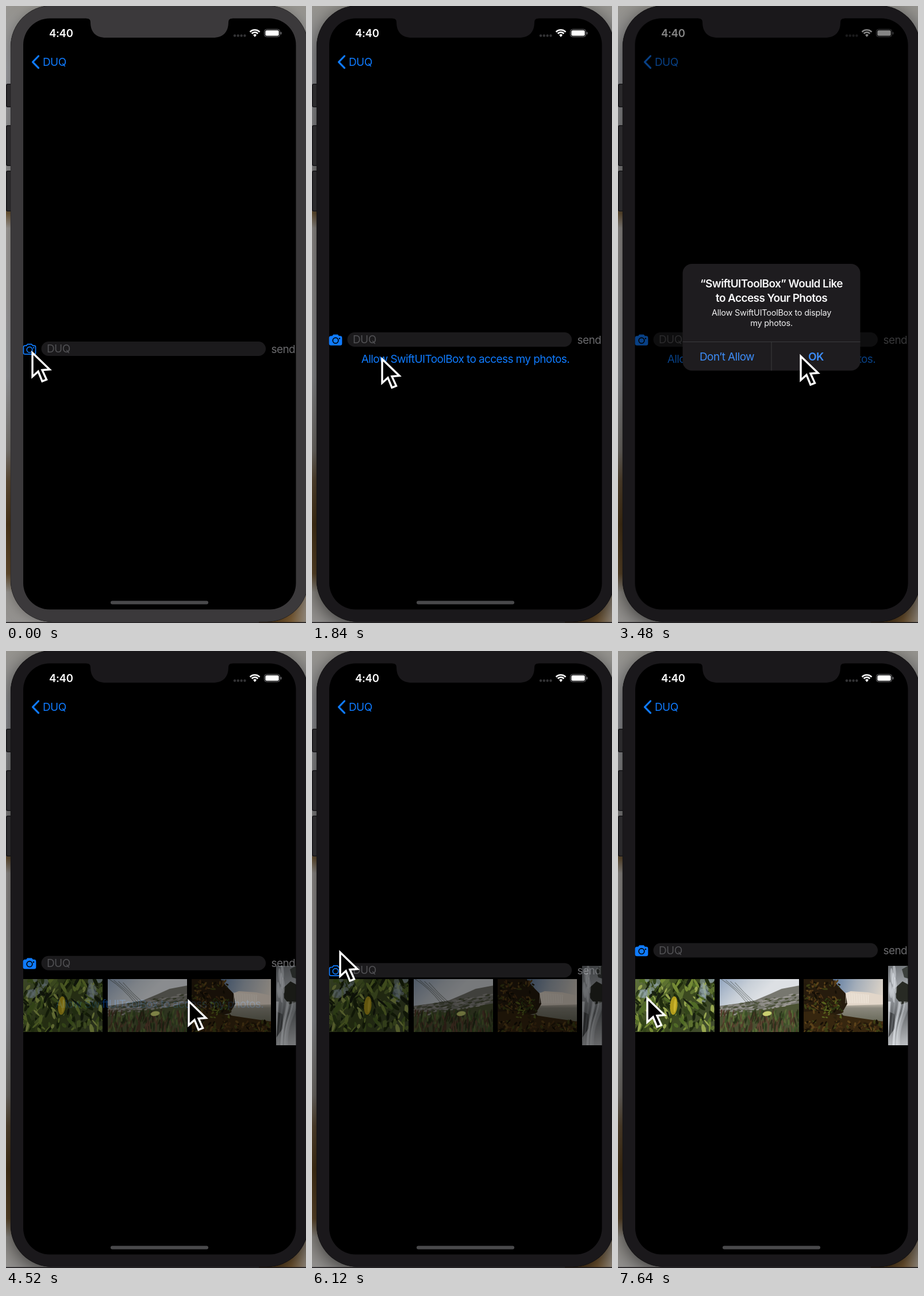
Animation of 522 by 1072 pixels, one loop 7680 ms. Source, as an HTML page with a canvas:

```html
<!DOCTYPE html>
<html lang="en">
<head>
<meta charset="utf-8">
<title>Photo permission demo</title>
<style>
html, body { margin: 0; width: 100%; height: 100%; overflow: hidden; background: #000; }
canvas { display: block; width: 522px; height: 1072px; }
</style>
</head>
<body>
<canvas id="stage" width="522" height="1072"></canvas>
<script>
const LOOP = 7680;
const BLUE = '#0f7bff';
const NAME = 'DUQ';
const ctx = document.getElementById('stage').getContext('2d');

const clamp = v => Math.max(0, Math.min(1, v));
const mix = (a, b, p) => a + (b - a) * p;
const span = (t, from, to) => clamp((t - from) / (to - from));
const easeOut = p => 1 - (1 - p) ** 3;
const smooth = p => p * p * (3 - 2 * p);

// cubic-bezier(.42, 0, .58, 1)
function easeInOut(x) {
  let lo = 0, hi = 1, u = x;
  for (let i = 0; i < 18; i++) {
    u = (lo + hi) / 2;
    const bx = 1.26 * u * (1 - u) ** 2 + 1.74 * u * u * (1 - u) + u ** 3;
    if (bx < x) lo = u; else hi = u;
  }
  return smooth(u);
}
const slide = (t, start) => easeInOut(span(t, start, start + 350));

function seeded(seed) {
  return () => (seed = (seed * 16807) % 2147483647) / 2147483647;
}

function gradient(c, x0, y0, x1, y1, colors) {
  const g = c.createLinearGradient(x0, y0, x1, y1);
  colors.forEach(([at, color]) => g.addColorStop(at, color));
  return g;
}

function box(x, y, w, h, r, color, c = ctx) {
  c.fillStyle = color;
  c.beginPath();
  c.roundRect(x, y, w, h, r);
  c.fill();
}

function leaf(c, x, y, len, width, angle, color) {
  c.fillStyle = color;
  c.beginPath();
  c.ellipse(x, y, len, width, angle, 0, 7);
  c.fill();
}
const disc = (x, y, r, color, c = ctx) => leaf(c, x, y, r, r, 0, color);

function poly(c, points, color) {
  c.fillStyle = color;
  c.beginPath();
  points.forEach(([x, y]) => c.lineTo(x, y));
  c.closePath();
  c.fill();
}

// y is the middle of the capital letters
function text(s, x, y, color, { size = 19, weight = 400, align = 'left', track = -0.6 } = {}) {
  ctx.font = `${weight} ${size}px Inter, sans-serif`;
  ctx.letterSpacing = track + 'px';
  ctx.textAlign = align;
  ctx.fillStyle = color;
  ctx.fillText(s, x, y + size * 0.364);
}

function makePhoto(w, h, paint) {
  const canvas = document.createElement('canvas');
  canvas.width = w;
  canvas.height = h;
  const c = canvas.getContext('2d');
  c.filter = 'blur(0.7px)';
  paint(c, seeded(w * 31 + h));
  return canvas;
}

function foliage(c, rnd) {
  c.fillStyle = gradient(c, 0, 0, 138, 92, [[0, '#5f7040'], [.45, '#3a481c'], [1, '#424d30']]);
  c.fillRect(-2, -2, 142, 96);
  const greens = ['#1e2a0d', '#33451a', '#506a26', '#748a35', '#98a750', '#182010', '#5d7130'];
  for (let i = 0; i < 200; i++) {
    if (i % 11 === 0) {
      const x = i % 2 ? rnd() * 40 : 115 + rnd() * 23;
      disc(x, rnd() * 42, 3 + rnd() * 5, 'rgba(150,168,178,.55)', c);
    }
    leaf(c, rnd() * 138, rnd() * 92, 4 + rnd() * 8, 1.3 + rnd() * 2.4, .6 + rnd() * 1.9, greens[i % greens.length]);
  }
  leaf(c, 67, 46, 16, 6.5, 1.65, '#b39d1c');
  leaf(c, 69, 46, 12, 2, 1.65, '#cdb62f');
}

function meadow(c, rnd) {
  c.fillStyle = gradient(c, 0, 0, 50, 50, [[0, '#93a6c0'], [.6, '#c9d0d8'], [1, '#dde0e4']]);
  c.fillRect(-2, -2, 142, 96);
  poly(c, [[-2, 47], [35, 42], [62, 37], [88, 26], [108, 17], [140, 11], [140, 94], [-2, 94]], '#77776f');
  poly(c, [[-2, 59], [40, 54], [85, 51], [140, 42], [140, 94], [-2, 94]], '#4a5232');
  for (let i = 0; i < 170; i++) {
    const x = rnd() * 138;
    leaf(c, x, 49 - x * .18 + rnd() * 18, 2 + rnd() * 3, 1.3, -.2,
      ['#8d8b86', '#5b5f4c', '#9c9994', '#4a5038'][i % 4]);
  }
  for (let i = 0; i < 240; i++) {
    leaf(c, rnd() * 138, 58 + rnd() * 36, 4 + rnd() * 6, 1.2, 1.3 + rnd() * .7,
      ['#394f25', '#5b7038', '#4b3626', '#272f18', '#624534'][i % 5]);
  }
  c.strokeStyle = 'rgba(60,66,58,.75)';
  c.lineWidth = 1;
  for (let i = 0; i < 4; i++) {
    c.beginPath();
    c.moveTo(3 + i * 8, i * 2);
    c.quadraticCurveTo(28 + i * 5, 16 + i * 3, 48 + i * 5, 42);
    c.stroke();
  }
  leaf(c, 83, 60, 8, 4, -.15, '#c8cf70');
}

function waterfall(c, rnd) {
  c.fillStyle = gradient(c, 40, 0, 138, 30, [[0, '#4d6f9b'], [.5, '#a3adb9'], [1, '#dfd5c8']]);
  c.fillRect(-2, -2, 142, 96);
  c.fillStyle = gradient(c, 0, 42, 0, 76, [[0, '#cbc1b3'], [.25, '#8a877c'], [1, '#676858']]);
  c.fillRect(-2, 42, 142, 52);
  poly(c, [[66, 27], [82, 21], [112, 23], [140, 29], [140, 44], [74, 46]], '#e2d6c9');
  poly(c, [[-2, -2], [49, -2], [61, 13], [73, 25], [76, 43], [66, 60], [-2, 70]], '#261b0d');
  poly(c, [[-2, 57], [30, 55], [60, 62], [92, 67], [140, 74], [140, 94], [-2, 94]], '#36260f');
  for (let i = 0; i < 240; i++) {
    const x = rnd() * 138;
    const cliff = i % 2;
    leaf(c, cliff ? x * .45 : x, cliff ? 4 + rnd() * 54 : 74 + rnd() * 20, 2 + rnd() * 3, 1 + rnd(), rnd() * 3,
      ['#150f06', '#4a3114', '#5c431a', '#241a0b', '#3d4015'][i % 5]);
  }
  for (let i = 0; i < 60; i++) {
    leaf(c, 34 + rnd() * 34, 34 + rnd() * 34, 2 + rnd() * 2, 1.2, rnd() * 3, ['#59651f', '#303d14', '#2b210d'][i % 3]);
  }
  c.strokeStyle = 'rgba(255,250,240,.6)';
  for (let i = 0; i < 14; i++) {
    c.beginPath();
    c.moveTo(74 + i * 3, 23 + i * .3);
    c.lineTo(73 + i * 3, 42);
    c.stroke();
  }
}

function stream(c, rnd) {
  c.fillStyle = gradient(c, 0, 0, 36, 138, [[0, '#6d7175'], [.3, '#a5a9ae'], [.6, '#66696c'], [1, '#bfc1c4']]);
  c.fillRect(-2, -2, 40, 142);
  poly(c, [[13, 38], [25, 27], [38, 34], [38, 62], [23, 67], [14, 56]], '#282a24');
  poly(c, [[-2, 78], [11, 84], [12, 108], [-2, 128]], '#414345');
  poly(c, [[24, 6], [38, -2], [38, 23], [28, 20]], '#3c403d');
  c.lineWidth = 3;
  for (let i = 0; i < 14; i++) {
    const x = rnd() * 36;
    c.strokeStyle = `rgba(232,236,241,${.15 + rnd() * .35})`;
    c.beginPath();
    c.moveTo(x, 62);
    c.bezierCurveTo(x - 2, 85, x * .5, 98, x * .65 - 4, 138);
    c.stroke();
  }
  for (let i = 0; i < 6; i++) leaf(c, 3 + rnd() * 12, 10 + i * 8, 14, 2.5, 1.5, 'rgba(228,232,237,.5)');
}

const photos = [
  [30, 570, makePhoto(138, 92, foliage)],
  [176.5, 570, makePhoto(138, 92, meadow)],
  [323, 570, makePhoto(138, 92, waterfall)],
  [470, 547, makePhoto(36, 138, stream)]
];

function drawDesktop(focused) {
  ctx.fillStyle = gradient(ctx, 0, 0, 0, 1072, [
    [0, '#96948f'], [.1, '#95969a'], [.31, '#858483'], [.335, '#695334'], [.36, '#9a9693'],
    [.6, '#929396'], [.72, '#77736e'], [.77, '#5c4a33'], [.84, '#493417'], [.92, '#60492b'], [.95, '#918e89'], [1, '#949290']
  ]);
  ctx.fillRect(0, 0, 522, 1072);
  ctx.fillStyle = gradient(ctx, 470, 0, 522, 0, [[0, '#5d421f'], [.5, '#785a33'], [1, '#8d8478']]);
  ctx.fillRect(440, 1000, 82, 72);
  // window shadow, deepest beside the body
  ctx.save();
  ctx.shadowColor = `rgba(0,0,0,${focused ? .6 : .25})`;
  ctx.shadowBlur = focused ? 34 : 20;
  ctx.shadowOffsetY = focused ? 8 : 2;
  box(8, -1, 518, 1071, 72, '#000');
  ctx.restore();
  ctx.fillStyle = '#19171a';
  ctx.fillRect(0, 1070.5, 522, 2);
  [[135, 41], [207, 71], [286, 71]].forEach(([y, h]) => {
    box(0, y, 12, h, 3, '#171619');
    box(1.5, y + 1.5, 8, h - 3, 2, '#2b2a2c');
  });
}

function drawBody(color) {
  box(8, -1, 518, 1071, 72, color);
  ctx.strokeStyle = 'rgba(0,0,0,.25)';
  ctx.lineWidth = 1;
  ctx.stroke();
  box(30, 21.5, 474.5, 1027, 46, '#000');
}

function drawNotch(color) {
  ctx.fillStyle = color;
  ctx.beginPath();
  ctx.moveTo(140, 20);
  ctx.lineTo(140, 21.5);
  ctx.quadraticCurveTo(147, 21.5, 147, 28);
  ctx.bezierCurveTo(147, 45, 156, 55, 174, 55);
  ctx.lineTo(360, 55);
  ctx.bezierCurveTo(378, 55, 387, 45, 387, 28);
  ctx.quadraticCurveTo(387, 21.5, 394, 21.5);
  ctx.lineTo(394, 20);
  ctx.fill();
}

function drawStatus() {
  text('4:40', 75, 47.5, '#fff', { weight: 600, size: 18.5, track: -.3 });
  for (let i = 0; i < 4; i++) disc(398 + i * 5.8, 51.5, 2.2, '#343436');
  ctx.strokeStyle = '#fff';
  ctx.lineWidth = 2.7;
  [7.3, 11.5].forEach(r => {
    ctx.beginPath();
    ctx.arc(433, 53, r, -Math.PI * .76, -Math.PI * .24);
    ctx.stroke();
  });
  ctx.fillStyle = '#fff';
  ctx.beginPath();
  ctx.moveTo(433, 54);
  ctx.arc(433, 53, 4, -Math.PI * .76, -Math.PI * .24);
  ctx.fill();
  ctx.strokeStyle = '#77777a';
  ctx.lineWidth = 1;
  ctx.beginPath();
  ctx.roundRect(449.5, 40.5, 27, 13, 4);
  ctx.stroke();
  box(451.3, 42.2, 23.4, 9.6, 2.5, '#fff');
  box(477.8, 45, 1.6, 4.5, 1, '#77777a');
}

function drawBack() {
  ctx.strokeStyle = BLUE;
  ctx.lineWidth = 3.2;
  ctx.lineCap = 'round';
  ctx.lineJoin = 'round';
  ctx.beginPath();
  ctx.moveTo(56.5, 87);
  ctx.lineTo(46.5, 97.3);
  ctx.lineTo(56.5, 107.6);
  ctx.stroke();
  text(NAME, 64, 97.5, BLUE);
}

function drawCamera(y, filled) {
  ctx.save();
  ctx.translate(41, y);
  ctx.lineWidth = 1.7;
  ctx.lineJoin = 'round';
  ctx.strokeStyle = ctx.fillStyle = BLUE;
  ctx.beginPath();
  ctx.moveTo(-10.5, -3.5);
  ctx.quadraticCurveTo(-10.5, -6, -8, -6);
  ctx.lineTo(-5.5, -6);
  ctx.lineTo(-3.5, -8.6);
  ctx.lineTo(3.5, -8.6);
  ctx.lineTo(5.5, -6);
  ctx.lineTo(8, -6);
  ctx.quadraticCurveTo(10.5, -6, 10.5, -3.5);
  ctx.lineTo(10.5, 6);
  ctx.quadraticCurveTo(10.5, 8.7, 8, 8.7);
  ctx.lineTo(-8, 8.7);
  ctx.quadraticCurveTo(-10.5, 8.7, -10.5, 6);
  ctx.closePath();
  ctx.stroke();
  if (filled) ctx.fill();
  ctx.strokeStyle = filled ? '#000' : BLUE;
  ctx.beginPath();
  ctx.arc(0, 1, 4.8, 0, 7);
  ctx.stroke();
  disc(7, -2.5, 1.2, filled ? '#000' : BLUE);
  ctx.restore();
}

function drawRow(y, filled) {
  drawCamera(y + .7, filled);
  box(61.5, y - 12.5, 390.5, 25, 12.5, '#1b1a1c');
  text(NAME, 71, y - .3, '#505053');
  text('send', 461.5, y + .3, '#69696c');
}

function drawAlert(scale, alpha) {
  ctx.save();
  ctx.globalAlpha = alpha;
  ctx.translate(267, 540.7);
  ctx.scale(scale, scale);
  ctx.translate(-267, -540.7);
  box(112.5, 448, 309, 185.5, 16, '#1e1c1f');
  const title = { weight: 600, align: 'center' };
  const note = { size: 14.5, align: 'center', track: -.23 };
  text('“SwiftUIToolBox” Would Like', 267, 482, '#f7f7f8', title);
  text('to Access Your Photos', 267, 507.5, '#f7f7f8', title);
  text('Allow SwiftUIToolBox to display', 267, 532.5, '#f0f0f1', note);
  text('my photos.', 267, 550.5, '#f0f0f1', note);
  ctx.fillStyle = '#3b3a3d';
  ctx.fillRect(112.5, 583, 309, 1);
  ctx.fillRect(266.5, 583, 1, 50.5);
  text('Don’t Allow', 189.5, 609, '#3d8df8', { align: 'center' });
  text('OK', 344.5, 609, '#3d8df8', title);
  ctx.restore();
}

const arrow = [[2, 4.5], [2, 46], [12, 37], [19, 54], [26.5, 51], [19, 34.5], [32, 33.5]];
function drawCursor([x, y]) {
  ctx.save();
  ctx.translate(x, y);
  poly(ctx, arrow, '#000');
  ctx.strokeStyle = '#fff';
  ctx.lineWidth = 3.4;
  ctx.lineJoin = 'miter';
  ctx.stroke();
  ctx.restore();
}

const moves = [
  [1240, 2200, 155, 614],
  [3200, 3450, 316, 604],
  [4800, 5700, 47, 519],
  [6420, 6900, 49, 599]
];
function cursorAt(t) {
  return moves.reduce(([x, y], [from, to, nx, ny]) => {
    const p = smooth(span(t, from, to));
    return [mix(x, nx, p), mix(y, ny, p)];
  }, [44, 598]);
}

function draw(t) {
  const focused = t >= 400;
  const body = focused ? '#1a181b' : '#3b393b';
  const ask = slide(t, 800);
  const grant = slide(t, 4320);
  const close = slide(t, 5954);
  const reopen = slide(t, 7100);
  const shown = easeOut(span(t, 2590, 3030));
  const hidden = smooth(span(t, 3760, 4040));
  const modal = shown * (1 - hidden);

  let rowY = mix(595.5, 579.5, ask);
  rowY = mix(rowY, 520, grant);
  rowY = mix(rowY, 595.5, close);
  rowY = mix(rowY, 520, reopen);
  const filled = (t >= 800 && t < 5954) || t >= 7100;
  const photoAlpha = grant * (1 - close) + reopen;
  const press = span(t, 2420, 2480) * (1 - span(t, 2640, 2900));

  ctx.globalAlpha = 1;
  drawDesktop(focused);
  drawBody(body);

  ctx.save();
  ctx.beginPath();
  ctx.roundRect(29, 21.5, 475.5, 1027, 46);
  ctx.clip();
  drawStatus();
  drawBack();
  drawRow(rowY, filled);
  ctx.globalAlpha = ask * (1 - grant) * (1 - .4 * press);
  text('Allow SwiftUIToolBox to access my photos.', 267, 613, BLUE, { align: 'center' });
  ctx.globalAlpha = photoAlpha;
  photos.forEach(([x, y, image]) => ctx.drawImage(image, x, y));
  ctx.globalAlpha = clamp(1 - 1.8 * modal);
  box(182, 1033.5, 170, 6, 3, '#49494b');
  ctx.globalAlpha = 1;
  ctx.fillStyle = `rgba(0,0,0,${.48 * modal})`;
  ctx.fillRect(29, 21, 476, 1028);
  if (modal > 0) drawAlert(mix(1.21, 1, shown), modal);
  ctx.restore();

  drawNotch(body);
  drawCursor(cursorAt(t));
}

function tick() {
  draw(performance.now() % LOOP);
  requestAnimationFrame(tick);
}
tick();
</script>
</body>
</html>
```
